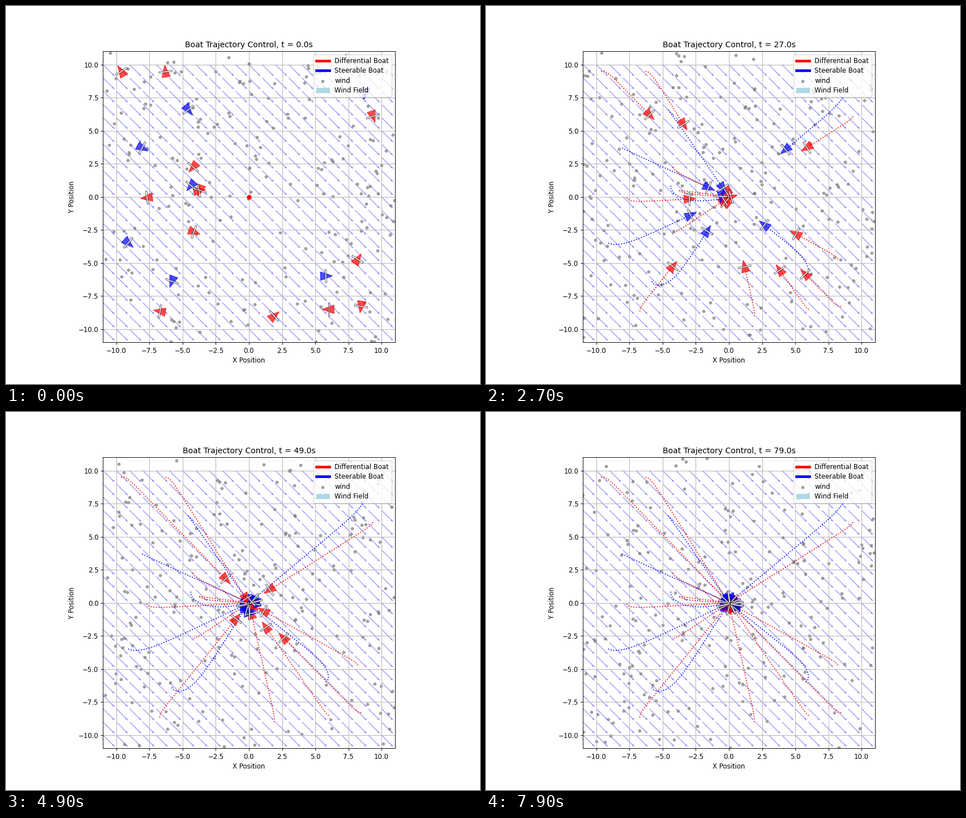
These frames come from a looping animation (837x669 px, 8 s). A matplotlib script:

```python
import numpy as np
import matplotlib.pyplot as plt
from matplotlib.animation import FuncAnimation
from matplotlib.lines import Line2D
from matplotlib.patches import Patch, Polygon

FRAMES = 80
SUBSTEPS = 10
LIMIT = 11
WIND = np.array([1, -1]) / np.sqrt(2)
WIND_ANGLE = -np.pi / 4

# start x, start y, heading in degrees
DIFFERENTIAL = [
    (-9.62, 9.48, 122), (-6.29, 9.46, 97), (9.35, 6.10, -71),
    (-4.20, 2.25, 229), (-3.77, 0.47, 10), (-3.70, 0.50, 250),
    (-7.68, -0.06, 188), (-4.15, -2.65, -20), (8.20, -4.72, 57),
    (-6.70, -8.65, 170), (1.90, -9.00, 40), (6.02, -8.50, 180),
    (8.45, -8.28, 262),
]
STEERABLE = [
    (-4.58, 6.58, -52), (-8.05, 3.70, -28), (-4.37, 0.85, 230),
    (-9.10, -3.48, -42), (-5.80, -6.38, 250), (5.80, -5.98, 2),
    (8.75, 7.85, 260),
]

HULL = np.array([(0.5, 0), (-0.4, 0.32), (-0.4, -0.32)])
SAIL = np.array([(0.06, 0.5), (-0.06, 0.5), (-0.06, -0.5), (0.06, -0.5)])


def simulate(starts, turn_gain, lag):
    """Steer every boat at the centre while it gathers speed."""
    x, y, degrees = np.array(starts, float).T
    heading = np.radians(degrees)
    dt = 1 / SUBSTEPS
    poses = []
    for step in range(FRAMES * SUBSTEPS):
        if step % SUBSTEPS == 0:
            poses.append(np.column_stack([x, y, heading]))
        error = np.arctan2(-y, -x) - heading
        error = (error + np.pi) % (2 * np.pi) - np.pi
        heading = heading + turn_gain * error * dt
        cruise = 0.247 + 0.038 * np.cos(heading - WIND_ANGLE)
        speed = cruise * (1 - np.exp(-step * dt / lag))
        x = x + speed * np.cos(heading) * dt
        y = y + speed * np.sin(heading) * dt
    return np.array(poses).transpose(1, 0, 2)


def place(shape, pose):
    c, s = np.cos(pose[2]), np.sin(pose[2])
    return shape @ np.array([[c, s], [-s, c]]) + pose[:2]


class Boat:
    def __init__(self, ax, poses, color):
        self.poses = poses
        self.trail, = ax.plot([], [], ":", color=color, lw=1.5)
        self.hull = ax.add_patch(Polygon(HULL, color=color, alpha=0.7, zorder=3))
        self.sail = ax.add_patch(Polygon(SAIL, fc="white", ec="black", lw=0.7,
                                         alpha=0.7, zorder=4))

    def show(self, i):
        self.trail.set_data(*self.poses[:i + 1, :2].T)
        self.hull.set_xy(place(HULL, self.poses[i]))
        self.sail.set_xy(place(SAIL, self.poses[i]))


fig, ax = plt.subplots(figsize=(10, 7.993), dpi=83.7)
ax.set_xlim(-LIMIT, LIMIT)
ax.set_ylim(-LIMIT, LIMIT)
ax.set_aspect("equal")
ax.grid(True)
ax.set_xlabel("X Position")
ax.set_ylabel("Y Position")
title = ax.set_title("")

axis = np.arange(-LIMIT, LIMIT)
gx, gy = np.meshgrid(axis, axis)
ax.quiver(gx, gy, np.ones(gx.shape), -np.ones(gy.shape),
          color="blue", alpha=0.5, scale=25, width=0.002)

dots = np.random.default_rng(4).uniform(-LIMIT, LIMIT, (200, 2))
particles = ax.scatter(*dots.T, s=15, c="gray", alpha=0.7, label="wind")
ax.plot(0, 0, "ro")

boats = [Boat(ax, p, "red") for p in simulate(DIFFERENTIAL, 0.4, 10)]
boats += [Boat(ax, p, "blue") for p in simulate(STEERABLE, 0.3, 1.6)]

ax.legend(handles=[
    Line2D([], [], color="red", lw=4, label="Differential Boat"),
    Line2D([], [], color="blue", lw=4, label="Steerable Boat"),
    particles,
    Patch(color="lightblue", label="Wind Field"),
], loc="upper right", labelspacing=0.38)


def update(i):
    title.set_text(f"Boat Trajectory Control, t = {i:.1f}s")
    drift = dots + 0.1 * i * WIND
    particles.set_offsets((drift + LIMIT) % (2 * LIMIT) - LIMIT)
    for boat in boats:
        boat.show(i)


anim = FuncAnimation(fig, update, frames=FRAMES, interval=100,
                     init_func=lambda: update(0), repeat=True, repeat_delay=0)
plt.show()
```
